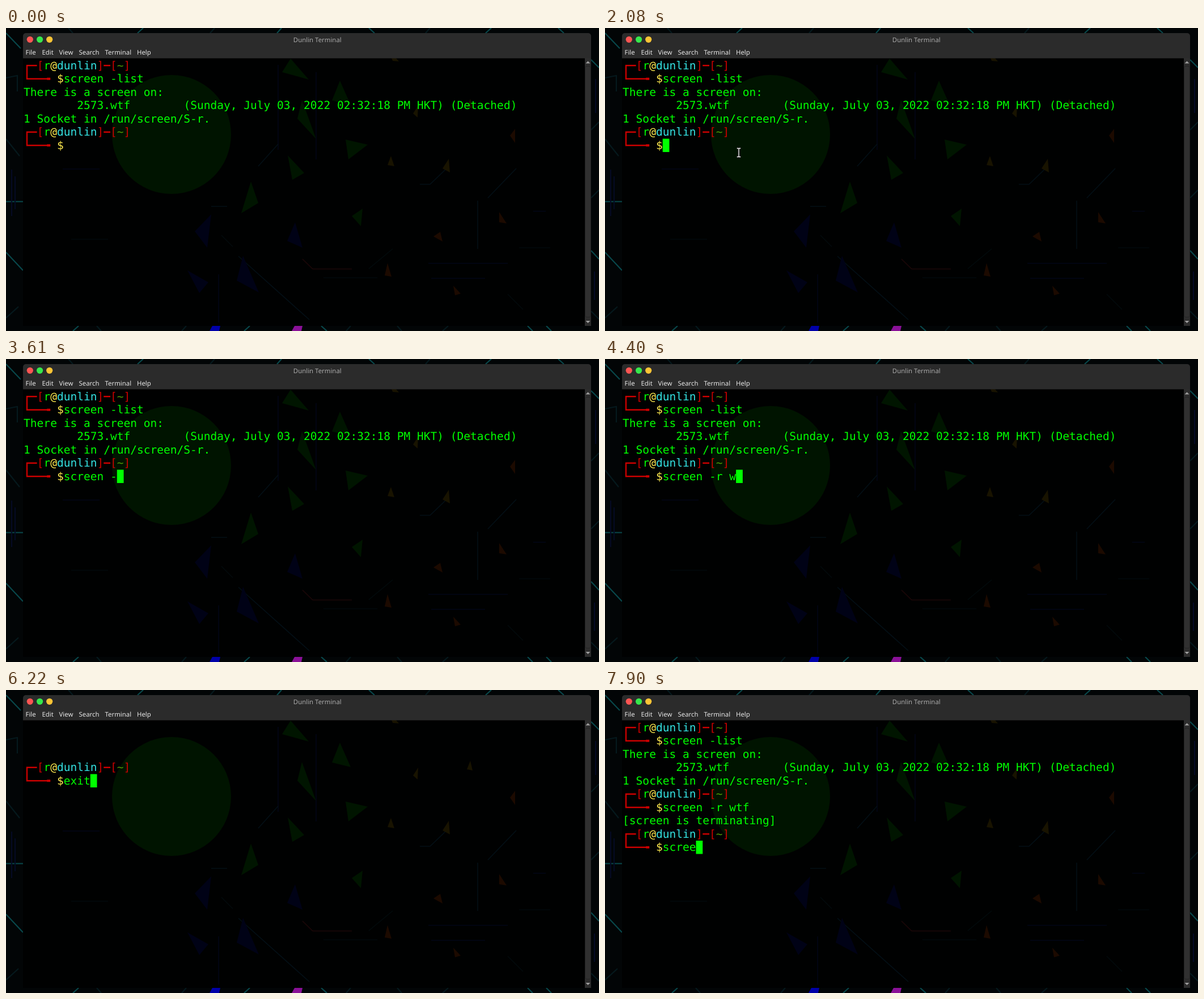
Write an HTML page that moves like this. It is 1046x535 px and loops after 8000 ms.

```html
<!DOCTYPE html>
<html lang="en">
<head>
<meta charset="utf-8">
<title>Terminal</title>
<style>
  html, body { margin: 0; width: 100%; height: 100%; overflow: hidden; background: #020506; }
  svg { display: block; width: 1046px; height: 535px; }
  text { text-rendering: geometricPrecision; white-space: pre; }
  .mono { font: 19.54px "DejaVu Sans Mono", monospace; }
  .ui { font: 11.4px "Noto Sans", sans-serif; fill: #e6e6e6; }
</style>
</head>
<body>
<svg id="stage" viewBox="0 0 1046 535" xmlns="http://www.w3.org/2000/svg">
  <g id="desk" fill="none"></g>
  <path d="M30 526V14a5 5 0 0 1 5-5H1027a5 5 0 0 1 5 5V526Z" fill="#000101"/>
  <g id="paper"></g>
  <path d="M30 53.5V14a5 5 0 0 1 5-5H1027a5 5 0 0 1 5 5V53.5Z" fill="#2b2b2b"/>
  <circle cx="42.3" cy="20.3" r="5.6" fill="#fc5553"/>
  <circle cx="59.6" cy="20.3" r="5.6" fill="#36e84c"/>
  <circle cx="76.7" cy="20.3" r="5.6" fill="#fdc435"/>
  <text class="ui" x="549.3" y="25" text-anchor="middle" style="fill:#a9a9a9">Dunlin Terminal</text>
  <g id="menu"></g>
  <rect x="1021" y="53" width="11" height="473" fill="#2d2d2d"/>
  <rect x="1021.5" y="67.5" width="10" height="443" rx="3" fill="#303030" stroke="#232323"/>
  <path d="M1022.5 62.5l4-4 4 4ZM1022.5 517l4 4 4-4Z" fill="#a0a0a0"/>
  <g id="term" class="mono"></g>
  <g id="mouse" fill="none">
    <path d="M-3.2-7.5H-1L0-6.7 1-7.5H3.2M0-6.7V6.7M-3.2 7.5H-1L0 6.7 1 7.5H3.2" stroke="#222" stroke-width="3"/>
    <path d="M-3.2-7.5H-1L0-6.7 1-7.5H3.2M0-6.7V6.7M-3.2 7.5H-1L0 6.7 1 7.5H3.2" stroke="#eee" stroke-width="1.3"/>
  </g>
</svg>
<script>
const $ = id => document.getElementById(id);
const LOOP = 8000, LEFT = 31.1, TOP = 54.5, CW = 11.765, CH = 23.5;
const GREEN = '#00ff00', RED = '#cc0000', YELLOW = '#fce94f', CYAN = '#34e2e2', OLIVE = '#4e9a06';

function add(parent, tag, attrs, text = '') {
  const el = document.createElementNS('http://www.w3.org/2000/svg', tag);
  for (const k in attrs) el.setAttribute(k, attrs[k]);
  el.textContent = text;
  return parent.appendChild(el);
}
const colX = c => LEFT + c * CW;
const rowY = r => TOP + r * CH;

// Wallpaper outside the window
const deskLines = {
  '#08484b': 'M0 9L26 36M0 306.5H30M0 396L30 428M232 9L242 0M478 9L486 0M640 0L650 9M846 9L856 0M974 0L984 9M1032 56L1046 70M1032 393L1046 408M118 535L128 526M420 535L430 526M556 526L566 535M920 526L929 535M953 526L962 535',
  '#05191d': 'M0 88L20 84V112M0 196L24 226M0 512L22 492M160 526L168 535M310 535L318 526M600 535L608 526M690 526L698 535M770 535L780 526M1032 180L1046 166M1032 300L1046 286M1032 500L1046 514M110 0L118 9M360 9L368 0M740 9L748 0',
  '#050a24': 'M10 250V332M16 262V320M1040 90V150M1038 430V480'
};
for (const c in deskLines) add($('desk'), 'path', { d: deskLines[c], stroke: c, 'stroke-width': 2.2 });
add($('desk'), 'path', { d: 'M364 526H378L376 535H359Z', fill: '#0000a8' });
add($('desk'), 'path', { d: 'M509 526H523L521 535H504Z', fill: '#8a1198' });

// Dimmed wallpaper behind the text
const paperLines = {
  '#020617': 'M480 65V215M547 78V232M750 442H845M100 249H165M375 435V520M745 415.5H885M930 323.5H952',
  '#030f16': 'M832 305V390M410 403L535 515M480 205L445 244M362 315H390M900 248L850 300M730 276H748L775 250',
  '#020a0c': 'M115 373H180M885 470L912 497M640 425L682 390M905 388H960M560 441H655M380 366L400 386',
  '#1c0708': 'M523 408L541 425.5H610'
};
for (const c in paperLines)
  add($('paper'), 'path', { d: paperLines[c], stroke: c, fill: 'none', 'stroke-width': 1.6 });
add($('paper'), 'circle', { cx: 292, cy: 188, r: 105, fill: '#001400' });

const shards = {
  '#001500': 'M502 54L487 78 534 91ZM589 93L575 128 608 136ZM522 127L514 160 547 196ZM599 197L638 206 604 232ZM497 225L526 256 505 268ZM432 271L415 327 445 309ZM629 319L610 332 626 350Z',
  '#000216': 'M362 329L333 359 355 388ZM510 343L496 376 523 388ZM320 428L357 449 341 468ZM418 402L407 446 446 467Z',
  '#181300': 'M679 226L673 242 685 244ZM781 231L770 248 783 255ZM727 137L718 151 726 158ZM819 125L813 140 823 142ZM680 53H688L693 59 682 58Z',
  '#1c0a00': 'M898 178L889 190 898 203ZM870 325L883 345 870 343ZM766 360L754 368 770 377ZM673 415L668 437 680 439ZM789 455L802 469 792 472Z'
};
for (const c in shards) add($('paper'), 'path', { d: shards[c], fill: c });

const menu = { File: 34.5, Edit: 63.5, View: 93.5, Search: 128.5, Terminal: 174.5, Help: 231 };
for (const m in menu) add($('menu'), 'text', { class: 'ui', x: menu[m], y: 47 }, m);

const put = (g, col, row, text, fill = GREEN) =>
  add(g, 'text', { x: colX(col), y: rowY(row) + 18.2, fill }, text);

function prompt(g, row) {
  const a = rowY(row) + CH / 2, b = a + CH;
  add(g, 'path', {
    d: `M${colX(2)} ${a}H${colX(.5)}V${b}H${colX(4)}M${colX(12)} ${a}H${colX(13)}`,
    fill: 'none', stroke: RED, 'stroke-width': 2.4
  });
  add(g, 'path', { d: `M${colX(3.5)} ${b}H${colX(4)}`, stroke: RED, 'stroke-width': 4 });
  put(g, 2, row, '[', RED);
  put(g, 3, row, 'r');
  put(g, 4, row, '@', YELLOW);
  put(g, 5, row, 'dunlin', CYAN);
  put(g, 11, row, ']', RED);
  put(g, 13, row, '[', RED);
  put(g, 14, row, '~', OLIVE);
  put(g, 15, row, ']', RED);
  put(g, 5, row + 1, '$', YELLOW);
}

const group = () => add($('term'), 'g', {});
const listing = group(), cleared = group(), ended = group();
prompt(listing, 0);
put(listing, 6, 1, 'screen -list');
put(listing, 0, 2, 'There is a screen on:');
put(listing, 8, 3, '2573.wtf');
put(listing, 24, 3, '(Sunday, July 03, 2022 02:32:18 PM HKT) (Detached)');
put(listing, 0, 4, '1 Socket in /run/screen/S-r.');
prompt(listing, 5);
prompt(cleared, 3);
put(ended, 6, 6, 'screen -r wtf');
put(ended, 0, 7, '[screen is terminating]');
prompt(ended, 8);

const typed = put($('term'), 6, 0, '');
const caret = add($('term'), 'rect', { width: CW, height: CH, fill: GREEN });

// Each scene: start, input row, visible groups
const scenes = [
  [0, 6, [listing]],
  [5040, 4, [cleared]],
  [6720, 9, [listing, ended]]
];
// Time and the input line from then on
const input = [
  [0, ''], [2590, 's'], [2720, 'sc'], [2980, 'scr'], [3120, 'scre'], [3240, 'screen'],
  [3360, 'screen '], [3610, 'screen -'], [3880, 'screen -r'], [4010, 'screen -r '],
  [4400, 'screen -r w'], [4540, 'screen -r wtf '], [5040, ''], [5700, 'e'], [5830, 'ex'],
  [5950, 'exi'], [6220, 'exit'], [6720, ''], [7230, 's'], [7360, 'sc'], [7510, 'scr'],
  [7770, 'scre'], [7900, 'scree']
];
const blink = [[0, false], [520, true], [1160, false], [1680, true]];
const pointer = [
  [0], [260, 506, 486], [390, 478, 440], [520, 440, 390], [650, 400, 342], [770, 362, 300],
  [900, 323, 257], [1030, 209, 166], [1160, 172, 139], [1290, 206, 139], [1560, 214, 134],
  [1680, 178, 139], [1940, 234, 218], [2080, 236, 220], [2210, 130, 134], [2330, 424, 269], [2590]
];

const at = (table, t) => table.findLast(step => step[0] <= t);
const show = (el, on) => el.setAttribute('visibility', on ? 'visible' : 'hidden');

function render(t) {
  const [, row, groups] = at(scenes, t);
  for (const g of [listing, cleared, ended]) show(g, groups.includes(g));
  const line = at(input, t)[1];
  if (typed.textContent !== line) typed.textContent = line;
  typed.setAttribute('y', rowY(row) + 18.2);
  caret.setAttribute('x', colX(6 + line.length));
  caret.setAttribute('y', rowY(row));
  show(caret, at(blink, t)[1]);
  const [, x, y] = at(pointer, t);
  show($('mouse'), x !== undefined);
  if (x !== undefined) $('mouse').setAttribute('transform', `translate(${x} ${y})`);
}

const start = performance.now();
function tick() {
  render((performance.now() - start) % LOOP);
  requestAnimationFrame(tick);
}
tick();
</script>
</body>
</html>
```
